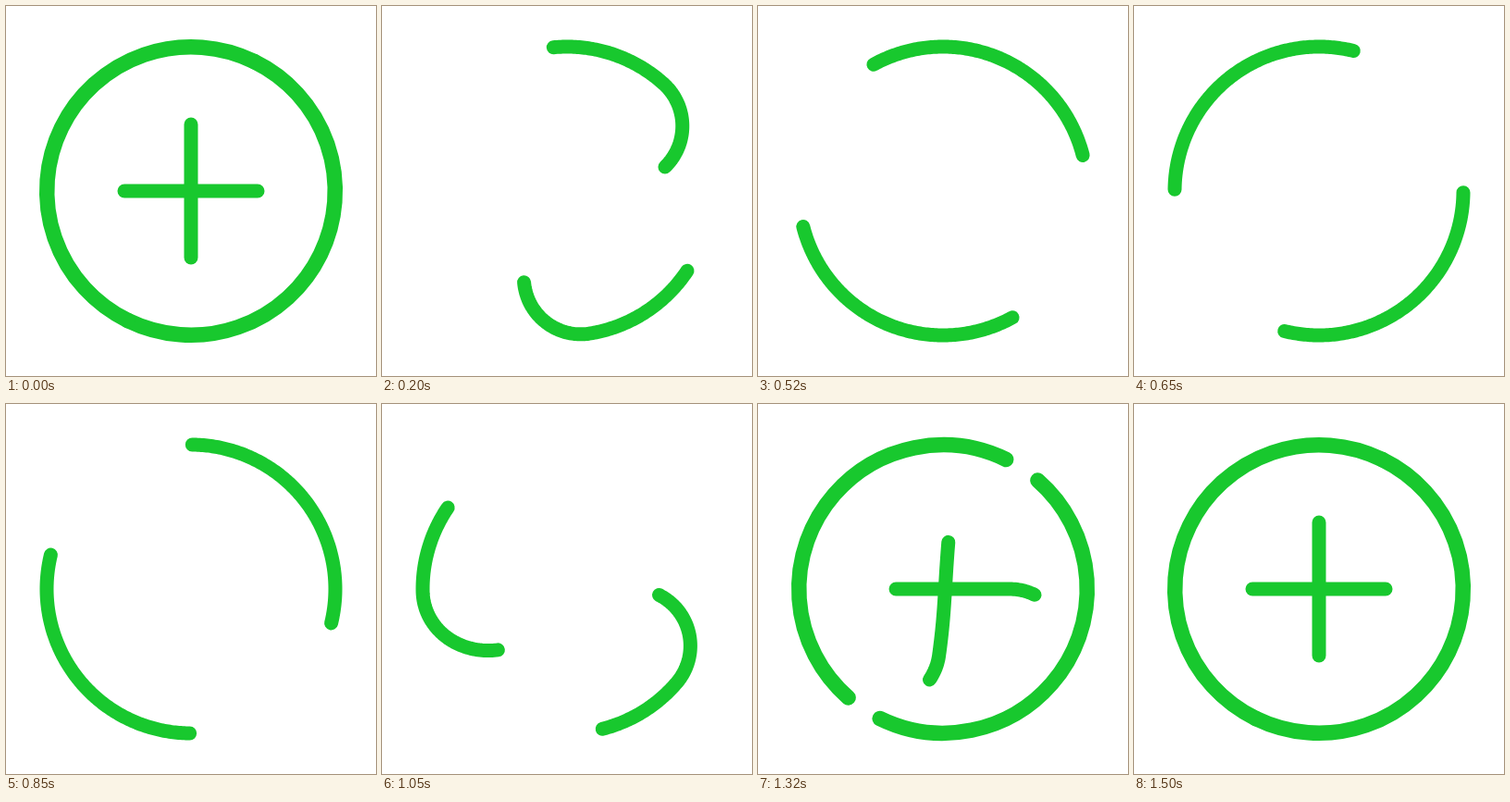
Write an HTML page with a canvas that moves like this. It is 400 by 400 pixels and loops after 1.52 s.

```html
<!DOCTYPE html>
<html>
<head>
<meta charset="utf-8">
<style>
  html, body { margin: 0; width: 100%; height: 100%; overflow: hidden; background: #fff; }
  canvas { display: block; }
</style>
</head>
<body>
<canvas id="stage" width="400" height="400"></canvas>
<script>
const ctx = document.getElementById('stage').getContext('2d');
const LOOP = 1520, RAD = Math.PI / 180;
const R = 156, HALF = 72;                        // ring radius, half length of a bar
const BEND = (R * R - HALF * HALF) / (2 * R);    // arc touching both bar and ring
const JOIN = Math.atan2(BEND, HALF);             // angle where the bend meets the ring
const BEND_END = 2 * HALF + BEND * (Math.PI / 2 + JOIN);
const TRAVEL = 1770;                             // whole way from bar to bar
const SWITCH = 750;                              // leaving before, returning after

// Smooth monotone curve through [time, value] points
function track(points) {
  const rate = points.slice(1).map(([t, v], i) => (v - points[i][1]) / (t - points[i][0]));
  const slope = points.map((_, i) => {
    const a = rate[i - 1], b = rate[i];
    return a * b > 0 ? 2 * a * b / (a + b) : 0;
  });
  return t => {
    let i = 0;
    while (i < points.length - 2 && t > points[i + 1][0]) i++;
    const [t0, v0] = points[i], [t1, v1] = points[i + 1], d = t1 - t0;
    const u = Math.min(1, Math.max(0, (t - t0) / d)), w = 1 - u;
    return v0 * w * w * (1 + 2 * u) + v1 * u * u * (3 - 2 * u)
      + d * u * w * (slope[i] * w - slope[i + 1] * u);
  };
}

const head = track([[0, 144], [200, 413], [400, 760], [650, 1105], [850, 1350], [1200, 1715], [1500, 1770]]);
const tail = track([[0, 0], [200, 183], [400, 479], [650, 824], [850, 1069], [1200, 1553], [1500, 1626]]);
const spread = track([[0, 0], [200, 0.433], [400, 1]]);
const swing = track([[850, 180], [1200, 105], [1500, 90]]);

// Point at distance s along bar, bend and ring
function along(s) {
  if (s < 2 * HALF) return [s - HALF, 0];
  if (s < BEND_END) {
    const a = (s - 2 * HALF) / BEND;
    return [HALF + BEND * Math.sin(a), BEND * (1 - Math.cos(a))];
  }
  const a = JOIN + (s - BEND_END) / R;
  return [R * Math.cos(a), R * Math.sin(a)];
}

function strand(from, to, angle, side, sag) {
  const steps = Math.ceil(Math.abs(to - from) / 2);
  const c = Math.cos(angle * RAD), n = Math.sin(angle * RAD);
  ctx.beginPath();
  for (let i = 0; i <= steps; i++) {
    const s = from + (to - from) * i / steps;
    let [x, y] = along(s);
    y = side * y - sag * Math.exp(-(((s - 117) / 70) ** 2));
    ctx.lineTo(x * c - y * n, x * n + y * c);
  }
  ctx.stroke();
}

function ring(span) {
  if (span <= 0) return;
  for (const end of [116, 296]) {
    ctx.beginPath();
    ctx.arc(0, 0, 155.8, (end - span) * RAD, end * RAD);
    ctx.stroke();
  }
}

function draw(t) {
  ctx.setTransform(1, 0, 0, 1, 0, 0);
  ctx.fillStyle = '#fff';
  ctx.fillRect(0, 0, 400, 400);
  ctx.translate(200, 200);
  ctx.strokeStyle = '#18c82e';
  ctx.lineCap = ctx.lineJoin = 'round';

  ctx.lineWidth = 16.5;
  if (t < 180) ring(180 * (1 - (t / 180) ** 1.5));
  if (t > 1100) ring(180 * (1 - ((1500 - t) / 400) ** 3));

  ctx.lineWidth = 15;
  const h = head(t), e = tail(t);
  if (t < SWITCH) {
    const p = spread(t);
    strand(e, h, -17.3 * p, -1, 0);
    strand(e, h, 90 + 72.7 * p, -1, 0);
  } else {
    const angle = swing(t);
    strand(TRAVEL - e, TRAVEL - h, 0, 1, 0);
    strand(TRAVEL - e, TRAVEL - h, angle, 1, Math.min(12, 0.6 * (angle - 90)));
  }
}

function frame() {
  const t = performance.now() % LOOP;
  // 40 poses a second, shown for 20 and 30 ms in turn
  draw(50 * Math.floor(t / 50) + (t % 50 >= 20 ? 25 : 0));
  requestAnimationFrame(frame);
}
frame();
</script>
</body>
</html>
```
